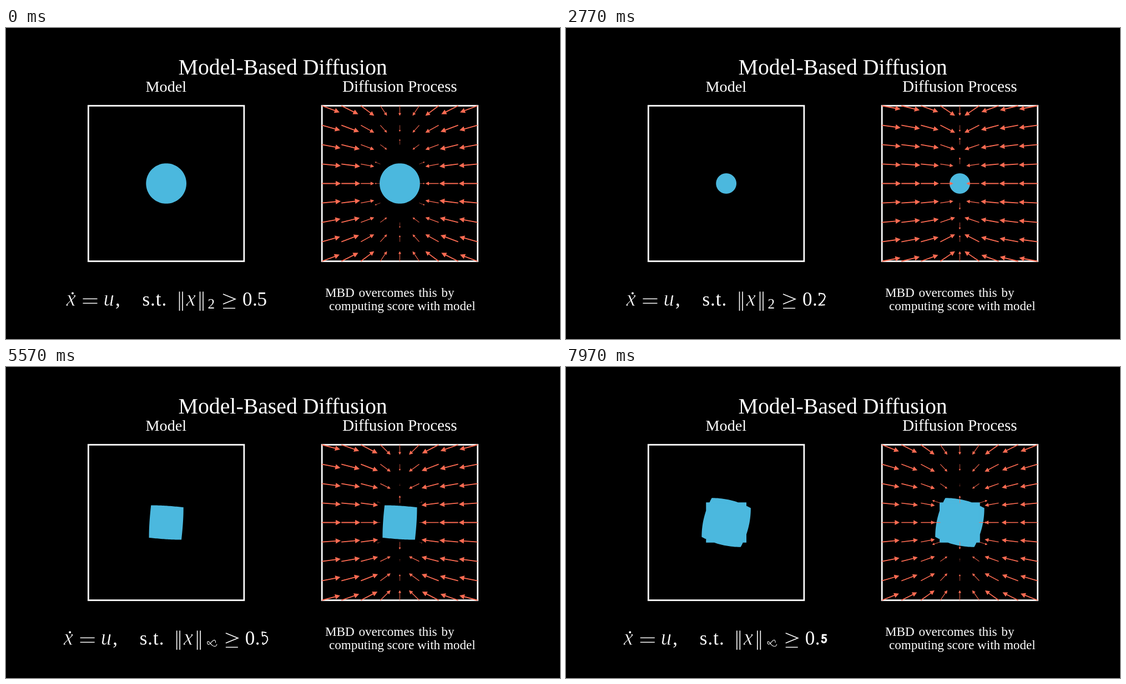
An HTML page that plays this animation: 998x561 px, repeating every 8000 ms.

```html
<!DOCTYPE html>
<html lang="en">
<head>
<meta charset="utf-8">
<title>Model-Based Diffusion</title>
<style>
  html, body { margin: 0; width: 100%; height: 100%; overflow: hidden; background: #000; }
  svg { display: block; width: 100vw; height: 100vh; }
  text { font-family: "Liberation Serif", "Times New Roman", serif; fill: #fff; white-space: pre; }
  .math { font-size: 35px; }
  .var { font-size: 39px; font-style: italic; stroke: #000; stroke-width: 0.7; }
  .line { fill: none; stroke: #fff; stroke-width: 1.6; }
  .glyph { fill: none; stroke: #fff; stroke-linecap: round; stroke-linejoin: round; }
  .box { fill: none; stroke: #fff; stroke-width: 2.8; }
  .shape { fill: #4bb8de; stroke: #4bb8de; stroke-width: 2.6; }
</style>
</head>
<body>
<svg viewBox="0 0 998 561">
  <rect width="998" height="561"/>
  <text x="310.5" y="83.5" font-size="39.8">Model-Based Diffusion</text>
  <text x="251.5" y="115" font-size="28.2">Model</text>
  <text x="606" y="115" font-size="29">Diffusion Process</text>
  <text x="575" y="485" font-size="23.1" word-spacing="2">MBD overcomes this by</text>
  <text x="582" y="508.5" font-size="23.1">computing score with model</text>

  <rect class="box" x="148.375" y="140.25" width="280.5" height="280.5"/>
  <rect class="box" x="569.125" y="140.25" width="280.5" height="280.5"/>
  <path class="shape" id="left"/>
  <path class="shape" id="right"/>
  <path id="arrows" fill="#ff6b52"/>

  <g id="lhs">
    <text class="var" x="108.5" y="500.5">x</text>
    <circle cx="120" cy="478.5" r="2" fill="#fff"/>
    <path class="line" d="M138.500 488.5h26M138.500 496.500h26"/>
    <text class="var" x="175.5" y="500.5">u</text>
    <text class="math" x="197" y="500.5">,</text>
    <text class="math" x="245.5" y="500.5" letter-spacing="1">s.t.</text>
    <path class="line" d="M312.500 475.500v34.500M318 475.500v34.500M349.500 475.500v34.500M355 475.500v34.500"/>
    <text class="var" x="324.5" y="500.5">x</text>
  </g>
  <text id="subText" x="363.500" y="505.500" font-size="25">2</text>
  <path class="glyph" id="sub"/>
  <g id="rhs">
    <path class="line" d="M391 480L413 489L391 498M391 505.500H413"/>
    <text class="math" x="426" y="500.5">0</text>
    <text class="math" x="444" y="500.5">.</text>
    <text class="math" id="digitText" x="452.500" y="500.5"></text>
    <path class="glyph" id="digit"/>
  </g>
</svg>
<script>
const LOOP = 8000, FIRST = 750, STEP = 3000;
const UNIT = 561 / 8, CY = 280.5, LEFT_X = 499 - 3 * UNIT, RIGHT_X = 499 + 3 * UNIT;
const $ = id => document.getElementById(id);
const mix = (a, b, s) => a + (b - a) * s;
const mixPoint = (p, q, s) => [mix(p[0], q[0], s), mix(p[1], q[1], s)];

const sigmoid = v => 1 / (1 + Math.exp(-v));
function smooth(u) {
  u = Math.max(0, Math.min(1, u));
  const e = sigmoid(-5);
  return (sigmoid(10 * (u - 0.5)) - e) / (1 - 2 * e);
}

// pull: horizontal attraction per unit; near: vector next to the obstacle;
// column: upward pull on the middle column at heights 0.5, 1, 1.5 and 2.
const STATES = [
  { kind: "circle", size: 0.5, digit: "5", sub: "2", pull: 24, near: [10, 4], column: [1, 10, -12, -18] },
  { kind: "circle", size: 0.2, digit: "2", sub: "2", pull: 58, near: null, column: [14, 13.5, -12, -18] },
  { kind: "square", size: 0.5, digit: "5", sub: "inf", pull: 30, near: [17, 4.5], column: [13.5, -10, -12, -18] },
  { kind: "circle", size: 0.9, digit: "5", sub: "2", pull: 13, near: [9, 6], column: [13, 8, -12, -18] }
];

// Obstacle outline, counter-clockwise; the square starts at its upper right corner.
function outlinePoint({ kind, size }, u) {
  const r = size * UNIT;
  if (kind === "circle") return [r * Math.cos(u * 2 * Math.PI), -r * Math.sin(u * 2 * Math.PI)];
  const side = Math.floor(u * 4) % 4, along = r - 2 * r * (u * 4 - Math.floor(u * 4));
  return [[along, -r], [-r, -along], [-along, r], [r, along]][side];
}

function outline(cx, from, to, s) {
  const n = 96;
  let d = "";
  for (let i = 0; i < n; i++) {
    const [x, y] = mixPoint(outlinePoint(from, i / n), outlinePoint(to, i / n), s);
    d += (i ? "L" : "M") + (cx + x).toFixed(2) + " " + (CY + y).toFixed(2);
  }
  return d + "Z";
}

function field(state, x, y) {
  if (x === 0) {
    const row = Math.abs(y) * 2;
    return [0, row ? -Math.sign(y) * state.column[row - 1] : 0];
  }
  if (state.near && Math.abs(x) === 0.5 && Math.abs(y) <= 0.5) {
    return [state.near[0] * Math.sign(x), -state.near[1] * Math.sign(y)];
  }
  const g = [-state.pull * x, 9 * y];
  const scale = Math.min(1, 34 / Math.hypot(...g));
  return g.map(v => v * scale);
}

function arrow(x, y, [dx, dy]) {
  const len = Math.hypot(dx, dy);
  if (len < 0.5) return "";
  const ux = dx / len, uy = dy / len;
  const at = (along, across) =>
    (x + ux * along - uy * across).toFixed(2) + " " + (y + uy * along + ux * across).toFixed(2);
  const base = len * 0.73, half = len * 0.027, wing = len * 0.138;
  return "M" + [at(0, half), at(base, half), at(base, wing), at(len, 0),
    at(base, -wing), at(base, -half), at(0, -half)].join("L") + "Z";
}

function arrows(from, to, s) {
  let d = "";
  for (let x = -2; x <= 2; x += 0.5) {
    for (let y = -2; y <= 2; y += 0.5) {
      d += arrow(RIGHT_X + x * UNIT, CY - y * UNIT, mixPoint(field(from, x, y), field(to, x, y), s));
    }
  }
  return d;
}

// Pen strokes in em units, y upwards.
const PEN = {
  5: [[.4, .65], [.12, .65], [.1, .36], [.22, .42], [.36, .36], [.42, .22], [.36, .06], [.22, 0], [.1, .04], [.06, .12]],
  2: [[.06, .5], [.1, .62], [.22, .66], [.36, .62], [.42, .48], [.34, .32], [.2, .16], [.06, .02], [.25, .02], [.43, .02]]
};
function penPoint(name, u) {
  if (name === "inf") {
    const a = u * 2 * Math.PI;
    return [.52 + .45 * Math.cos(a), .24 + .2 * Math.sin(2 * a)];
  }
  const pts = PEN[name], k = Math.min(pts.length - 2, Math.floor(u * (pts.length - 1)));
  return mixPoint(pts[k], pts[k + 1], u * (pts.length - 1) - k);
}
function penPath(x, y, em, from, to, s) {
  const n = 54;
  let d = "";
  for (let i = 0; i <= n; i++) {
    const [px, py] = mixPoint(penPoint(from, i / n), penPoint(to, i / n), s);
    d += (i ? "L" : "M") + (x + px * em).toFixed(2) + " " + (y - py * em).toFixed(2);
  }
  return d;
}

// Plain text while a character rests, a morphing stroke while it changes.
function character(path, label, rest, d, width) {
  label.textContent = rest;
  path.setAttribute("d", rest ? "" : d);
  path.setAttribute("stroke-width", width);
}

function draw(t) {
  const clock = Math.max(0, t - FIRST) / STEP;
  const k = Math.min(2, Math.floor(clock));
  const s = smooth(clock - k), last = k === 2;
  const from = STATES[k], to = STATES[k + 1];

  for (const [id, cx] of [["left", LEFT_X], ["right", RIGHT_X]]) {
    const still = last ? outline(cx, from, from, 0) : "";
    $(id).setAttribute("d", still + outline(cx, from, to, s));
  }
  $("arrows").setAttribute("d", arrows(from, to, s));

  const wide = mix(from.sub === "inf" ? 1 : 0, to.sub === "inf" ? 1 : 0, s);
  $("lhs").setAttribute("transform", `translate(${-6.5 * wide} 0)`);
  $("rhs").setAttribute("transform", `translate(${6.5 * wide} 0)`);

  const thin = 1 - 2 * wide * (1 - wide);
  character($("sub"), $("subText"), wide < 0.01 ? "2" : "",
    penPath(363.5 - 6 * wide, 505.5 - wide, 25, "2", "inf", wide), 1.7 * thin);

  const resting = s < 0.01 ? from.digit : s > 0.99 ? to.digit : "";
  if (last && s >= 0.01) {
    const em = 35 * (1 - 1.4 * s);
    character($("digit"), $("digitText"), "",
      penPath(460.5 - 0.25 * em, 490 + 0.33 * em, em, "5", "5", 0), 2 + 4 * s);
  } else {
    character($("digit"), $("digitText"), resting,
      penPath(452.5, 500.5, 35, from.digit, to.digit, s), 2.4 - 2.5 * s * (1 - s));
  }
}

const start = performance.now();
function frame() {
  draw((performance.now() - start) % LOOP);
  requestAnimationFrame(frame);
}
frame();
</script>
</body>
</html>
```
